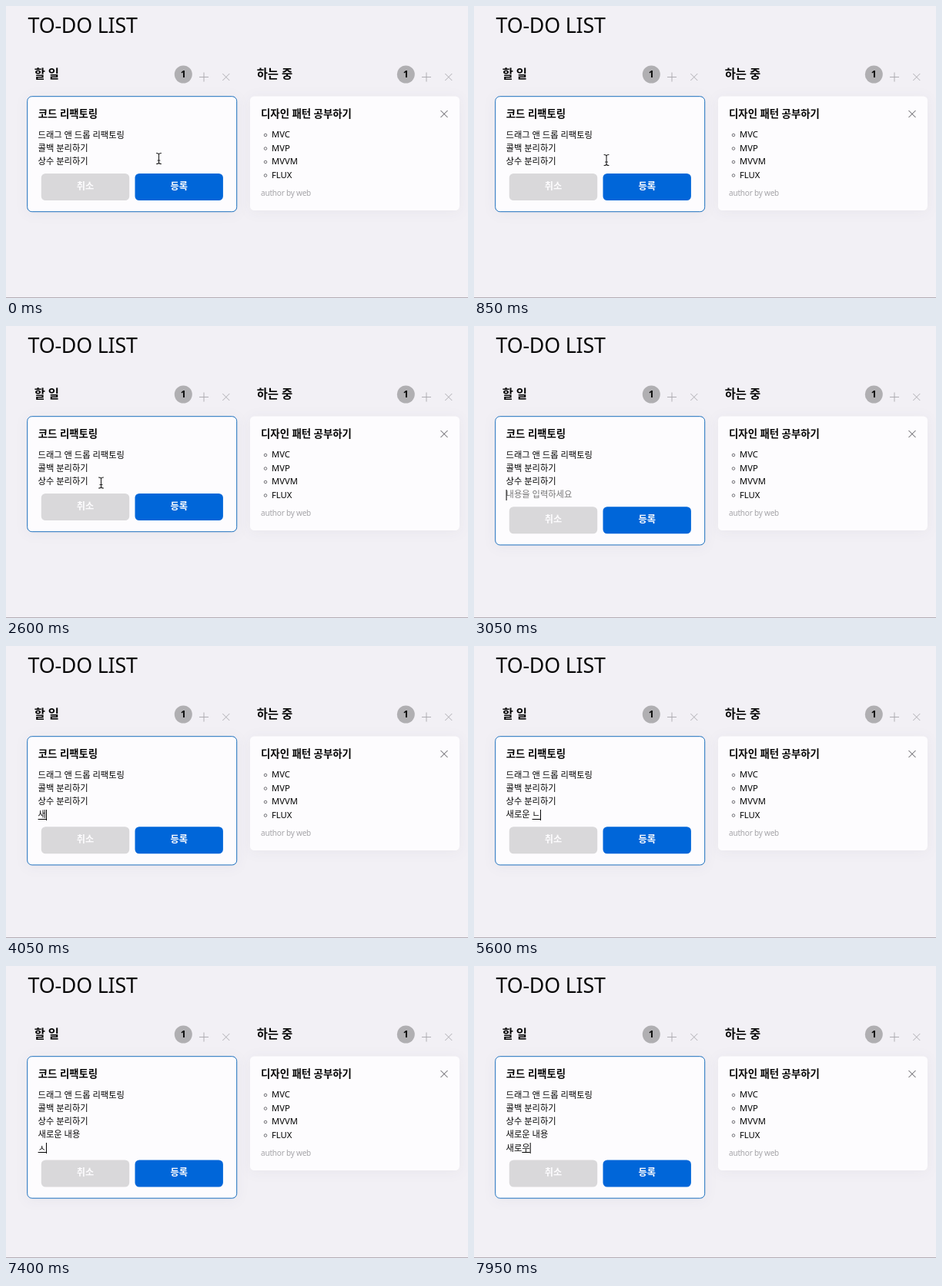
An HTML page that plays this animation: 600 px wide and 380 px high, repeating every 8000 ms.

```html
<!DOCTYPE html>
<html lang="ko">
<head>
<meta charset="utf-8">
<style>
  html, body { margin: 0; width: 100%; height: 100%; overflow: hidden; background: #f2f0f5; }
  svg { display: block; width: 100%; height: 100%; }
  text { font-family: "Noto Sans", "Noto Sans CJK KR", "Noto Sans CJK", sans-serif; white-space: pre; fill: #050505; }
  .heading { font-size: 26.8px; letter-spacing: -.2px; }
  .column { font-size: 15.4px; font-weight: 700; }
  .title { font-size: 13.4px; font-weight: 700; }
  .body { font-size: 11.25px; font-weight: 500; }
  .badge { font-size: 12.5px; font-weight: 700; text-anchor: middle; }
  .button { font-size: 12.2px; font-weight: 700; text-anchor: middle; fill: #fdfcfe; }
  .author { font-size: 10px; letter-spacing: -.2px; fill: #a5a4a8; }
  .hint { fill: #757575; }
  .card { fill: #fdfcfe; filter: drop-shadow(0 2px 8px rgba(40, 40, 70, .05)); }
  .icon { fill: none; stroke: #a9a8ad; stroke-width: .9; }
  .dark { stroke: #55545a; stroke-width: 1; }
</style>
</head>
<body>
<svg viewBox="0 0 600 380">
  <rect width="600" height="380" fill="#f2f0f5"/>
  <rect y="379" width="600" height="1" fill="#b5adb5"/>
  <text class="heading" x="28.5" y="35.2">TO-DO LIST</text>
  <g id="columns"></g>

  <rect id="editor" class="card" x="27.7" y="117.7" width="272" rx="6" stroke="#1c6fbd"/>
  <text class="title" x="41.8" y="145.3">코드 리팩토링</text>
  <g id="lines"></g>
  <text id="hint" class="body hint" x="41.6">내용을 입력하세요</text>
  <rect id="underline" height="1"/>
  <rect id="caret" width="1" height="14"/>
  <g id="buttons">
    <rect x="45.8" y="218" width="114.4" height="35" rx="5.5" fill="#d9d8da"/>
    <text class="button" x="103" y="238.7">취소</text>
    <rect x="167.5" y="218" width="114.4" height="35" rx="5.5" fill="#0066d9"/>
    <text class="button" x="224.7" y="238.7">등록</text>
  </g>

  <rect class="card" x="317" y="117.5" width="272" height="148.5" rx="5.5"/>
  <text class="title" x="331" y="145.3">디자인 패턴 공부하기</text>
  <path class="icon dark" d="M564.5 136l9 9m0-9l-9 9"/>
  <g id="topics"></g>
  <text class="author" x="331" y="247">author by web</text>

  <path id="pointer" d="M-3-7Q0-7 0-5Q0-7 3-7M0-5V5M-3 7Q0 7 0 5Q0 7 3 7M-1.5 2.5H1.5"
        fill="none" stroke="#222" stroke-width="1.1" stroke-linecap="round"/>
</svg>
<script>
const LOOP = 8000, LEFT = 41.6, ROW_HEIGHT = 17.25, BLINK = 500;
const MOVE_START = 350, MOVE_END = 1600, CLICK = 1700, FIRST_ENTER = 2700;
const $ = id => document.getElementById(id);
const set = (el, attrs) => Object.entries(attrs).forEach(([k, v]) => el.setAttribute(k, v));
const show = (el, visible) => { el.style.display = visible ? "" : "none"; };
const baseline = row => 171.6 + row * ROW_HEIGHT;

const committed = ["드래그 앤 드롭 리팩토링", "콜백 분리하기", "상수 분리하기", "새로운 내용"];

// Each keystroke: time, edited row, text of that row
const keystrokes = [
  [CLICK, 2, committed[2]],
  [FIRST_ENTER, 3, ""],
  [3950, 3, "ㅅ"], [4050, 3, "새"],
  [4700, 3, "새ㄹ"], [4800, 3, "새로"], [4850, 3, "새롱"], [4900, 3, "새로우"],
  [5000, 3, "새로운"], [5150, 3, "새로운 "],
  [5600, 3, "새로운 ㄴ"], [5700, 3, "새로운 내"], [5800, 3, "새로운 냉"],
  [5900, 3, "새로운 내요"], [5950, 3, "새로운 내용"],
  [6550, 4, ""],
  [7400, 4, "ㅅ"], [7500, 4, "새"],
  [7650, 4, "새ㄹ"], [7750, 4, "새로"], [7850, 4, "새롱"], [7950, 4, "새로우"]
];

$("columns").innerHTML = ["할 일", "하는 중"].map((name, i) => `
  <g transform="translate(${i * 289} 0)">
    <text class="column" x="36.7" y="93.5">${name}</text>
    <circle cx="230.3" cy="89" r="11.5" fill="#b0afb2"/>
    <text class="badge" x="230.3" y="93">1</text>
    <path class="icon" d="M251 92.5h12m-6-6v12M281.3 88l9 9m0-9l-9 9"/>
  </g>`).join("");

$("topics").innerHTML = ["MVC", "MVP", "MVVM", "FLUX"].map((name, i) => `
  <circle class="icon dark" cx="337" cy="${168 + i * 17.5}" r="1.8" style="stroke-width:.8"/>
  <text class="body" x="345" y="${171.2 + i * 17.5}">${name}</text>`).join("");

$("lines").innerHTML = [0, 1, 2, 3, 4].map(row =>
  `<text class="body" x="${LEFT}" y="${baseline(row)}"></text>`).join("");
const lineEls = [...$("lines").children];

function movePointer(t) {
  const p = Math.min(1, Math.max(0, (t - MOVE_START) / (MOVE_END - MOVE_START)));
  const eased = p * p * (3 - 2 * p);
  set($("pointer"), { transform: `translate(${198.5 - 75 * eased} ${198.5 + 5.5 * eased})` });
  show($("pointer"), t < FIRST_ENTER);
}

function render(t) {
  const [at, row, text] = keystrokes.findLast(k => k[0] <= t) || keystrokes[0];
  lineEls.forEach((el, i) => {
    const content = i < row ? committed[i] : i === row ? text : "";
    if (el.textContent !== content) el.textContent = content;
  });

  const grown = (row - 2) * ROW_HEIGHT;
  set($("editor"), { height: 150 + grown });
  set($("buttons"), { transform: `translate(0 ${grown})` });
  set($("hint"), { y: baseline(row) });
  show($("hint"), !text);

  const widthOf = count => count ? lineEls[row].getSubStringLength(0, count) : 0;
  const end = widthOf(text.length);
  const composing = row > 2 && text && !text.endsWith(" ");
  show($("underline"), composing);
  if (composing) {
    const start = widthOf(text.length - 1);
    set($("underline"), { x: LEFT + start, y: Math.round(baseline(row) + 1.7), width: end - start });
  }
  set($("caret"), { x: LEFT + end, y: Math.round(baseline(row) - 10.5) });
  show($("caret"), t >= CLICK && Math.floor((t - at) / BLINK) % 2 === 0);
  movePointer(t);
}

function frame() {
  render(performance.now() % LOOP);
  requestAnimationFrame(frame);
}
frame();
</script>
</body>
</html>
```
